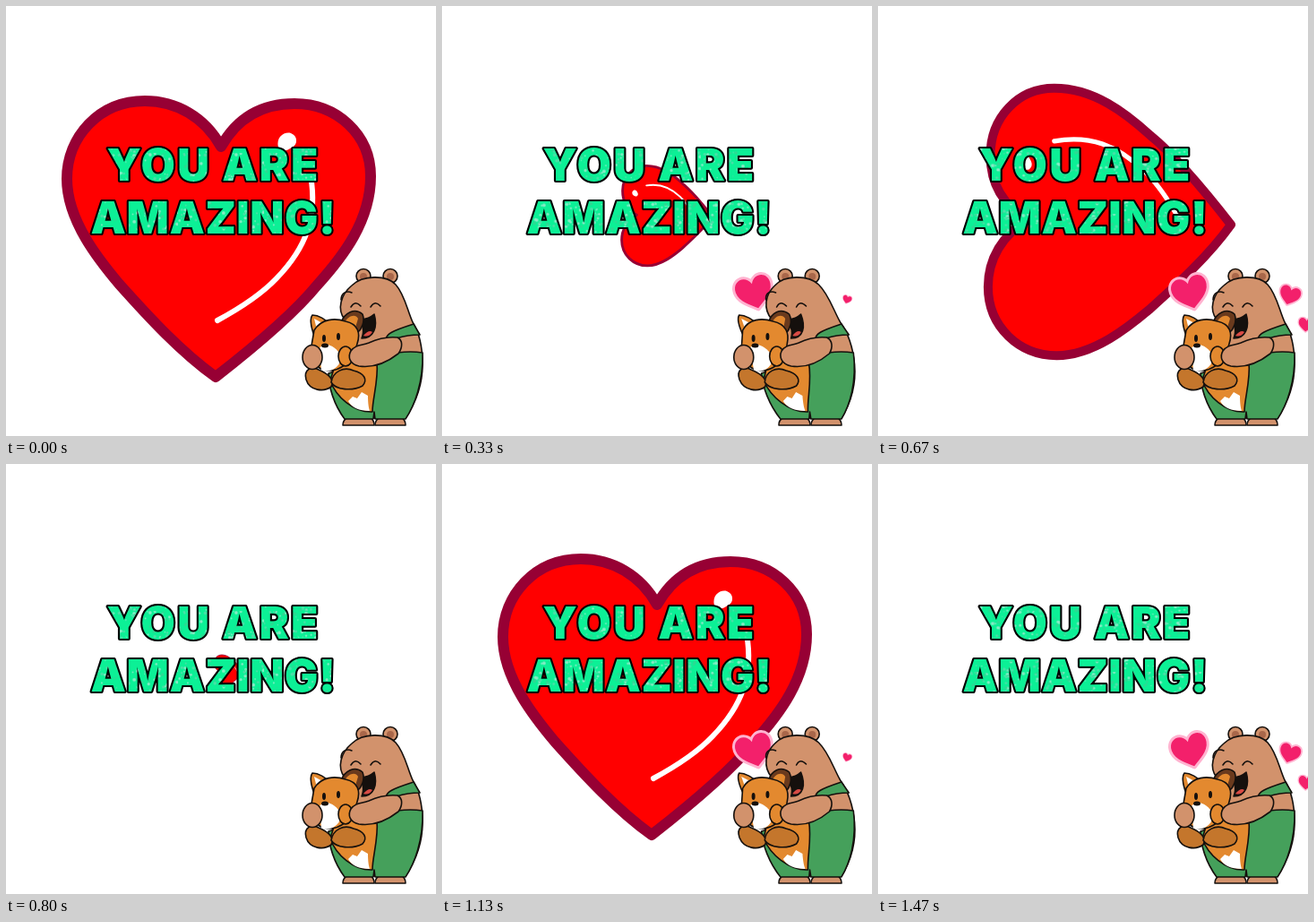
An HTML page with a canvas for the animation above (1540 ms loop, 480 by 480 pixels).

```html
<!DOCTYPE html>
<html lang="en">
<head>
<meta charset="utf-8">
<title>You are amazing</title>
<style>
html, body { margin: 0; overflow: hidden; background: #fff; }
canvas { display: block; width: 480px; height: 480px; }
</style>
</head>
<body>
<canvas id="stage" width="480" height="480"></canvas>
<script>
const ctx = document.getElementById('stage').getContext('2d');
const LOOP = 1540, STEP = 200 / 3, HUG = 12;
const TAN = '#d2926c', GREEN = '#45a05b', ORANGE = '#e3892f', RUST = '#c4762c', INK = '#15100d';

const HEART = new Path2D('M240,157C222,124 190,106 155,106C104,106 68,146 68,193C68,240 105,285 126,310C160,348 195,386 234,414C270,386 320,345 347,312C376,280 407,240 407,190C407,144 370,109 322,109C285,109 258,125 240,157Z');
const SHINE = new Path2D('M340,190C348,235 335,270 302,304C283,324 260,338 236,351');
const GLEAM = new Path2D('M304,158C301,146 311,140 318,142C326,145 326,155 319,158C314,161 309,164 304,158Z');
const LOVE = new Path2D('M0,-8C-5,-20 -21,-17 -20,-3C-19,8 -7,14 0,20C7,14 19,8 20,-3C21,-17 5,-20 0,-8Z');

const clamp = v => Math.max(0, Math.min(1, v));
const smooth = v => v * v * (3 - 2 * v);

function random(seed) {
  return () => (seed = (seed * 16807) % 2147483647) / 2147483647;
}

function makeGlitter() {
  const tile = document.createElement('canvas');
  tile.width = tile.height = 96;
  const g = tile.getContext('2d'), rnd = random(77);
  g.fillStyle = '#0cf096';
  g.fillRect(0, 0, 96, 96);
  for (let i = 0; i < 300; i++) {
    g.fillStyle = ['#2fd893', '#4be0a8', '#86ecc6'][i % 3];
    g.beginPath();
    g.arc(rnd() * 96, rnd() * 96, 0.6 + rnd() * 1.3, 0, 7);
    g.fill();
  }
  return ctx.createPattern(tile, 'repeat');
}
const glitter = makeGlitter();

function bigHeart(t) {
  // Each pulse: peak time and quarter turn
  for (const [peak, turn] of [[0, 0], [546, -1], [1100, 0]]) {
    if (Math.abs(t - peak) > 274) continue;
    const scale = 1 - smooth(clamp((Math.abs(t - peak) - 71) / 230));
    ctx.save();
    ctx.translate(240, 240);
    ctx.rotate(turn * Math.PI / 2);
    ctx.translate(10, 7);
    ctx.scale(scale, scale);
    ctx.translate(-250, -247);
    ctx.lineJoin = ctx.lineCap = 'round';
    ctx.fillStyle = '#f00';
    ctx.fill(HEART);
    ctx.lineWidth = 7 + 5 * scale;
    ctx.strokeStyle = '#970034';
    ctx.stroke(HEART);
    ctx.lineWidth = 6;
    ctx.strokeStyle = ctx.fillStyle = '#fff';
    ctx.stroke(SHINE);
    ctx.fill(GLEAM);
    ctx.restore();
    return;
  }
}

function title(frame) {
  ctx.font = '900 49.5px Inter, sans-serif';
  ctx.textAlign = 'center';
  ctx.lineJoin = 'round';
  ctx.lineWidth = 4.2;
  ctx.strokeStyle = '#000';
  const rnd = random(frame % 4 * 991 + 13);
  glitter.setTransform(new DOMMatrix().translate(rnd() * 96, rnd() * 96));
  ctx.fillStyle = glitter;
  for (const [line, y, spacing] of [['YOU ARE', 194.5, 2.2], ['AMAZING!', 253.5, 0.6]]) {
    ctx.letterSpacing = spacing + 'px';
    ctx.strokeText(line, 231.5, y);
    ctx.fillText(line, 231.5, y);
  }
}

function love(x, y, size, angle) {
  if (size <= 0) return;
  ctx.save();
  ctx.translate(x, y);
  ctx.rotate(angle);
  ctx.scale(size, size);
  ctx.lineJoin = 'round';
  ctx.lineWidth = 6;
  ctx.strokeStyle = '#ffb3d0';
  ctx.stroke(LOVE);
  ctx.fillStyle = '#f3206b';
  ctx.fill(LOVE);
  ctx.restore();
}

function smallHearts(p) {
  const left = clamp((p - 2) / 2.7);
  love(360 - 12 * left, 342 - 24 * left, left, -0.26);
  const right = clamp((p - 4) / 2.7);
  const settle = clamp((p - 7) / 3);
  love(446 + 17 * right - 3 * settle, 332 - 13 * right + 3 * settle, right * 0.66 - settle * 0.08, 0.3);
  love(478, 355, clamp((p - 8) / 2) * 0.42, 0.1);
}

function hug(p) {
  const lean = p < 8.8 ? Math.min(1, 1.2 * Math.sin(Math.PI * p / 8.8) ** 2) : 0;
  // Bends everything to the left above the feet
  const bend = (x, y) => {
    const h = Math.max(0, (467 - y) / 167);
    return [x - 16 * lean * h ** 1.4, y + 12 * lean * (1 - lean) * h];
  };
  const paint = (path, fill, line = INK, width = 1.6) => {
    if (fill) { ctx.fillStyle = fill; ctx.fill(path); }
    if (line) { ctx.strokeStyle = line; ctx.lineWidth = width; ctx.stroke(path); }
  };
  const shape = (d, ...style) => paint(new Path2D(
    d.replace(/([\d.]+),([\d.]+)/g, (_, x, y) => bend(+x, +y).join())), ...style);
  const oval = (x, y, rx, ry, ...style) => {
    const path = new Path2D();
    path.ellipse(...bend(x, y), rx, ry, 0, 0, 7);
    paint(path, ...style);
  };
  ctx.lineCap = ctx.lineJoin = 'round';

  // Bear
  for (const x of [399, 429]) {
    oval(x, 301.5, 8, 8, TAN);
    oval(x, 302, 4, 4, '#a9674a', null);
  }
  shape('M376,468C376,460 383,457 395,457C406,457 411,461 411,468Z', TAN);
  shape('M412,468C412,461 418,457 430,457C441,457 446,461 446,468Z', TAN);
  shape('M378,350C369,338 374,322 386,312C398,300 425,300 435,311C445,322 448,340 454,353C462,366 465,385 465,400C465,425 456,445 446,460L380,460C368,442 362,425 364,410Z', TAN);
  shape('M424,372C425,366 430,363 455,355L462,367Q448,367 436,371Z', GREEN);
  shape('M410,396L437,387Q452,385 465,387C466,420 456,446 446,461L412,461L411,453L410,461L378,461C366,445 360,425 360,410Z', GREEN);
  shape('M374,328C374,321 380,317 386,320', null);
  shape('M385,336Q390,328 396,335M407,336Q412,328 418,335', null);
  shape('M392,349Q403,351 411,344C415,358 411,371 397,371Q402,358 392,349Z', INK);
  shape('M399,368Q405,361 409,364Q405,370 399,368Z', '#d84b45', null);

  // Fox
  shape('M370,392C390,380 413,384 414,398C416,418 409,438 409,453C388,454 368,436 362,418Z', ORANGE);
  shape('M382,441L387,436L392,438L397,431L404,435C404,444 405,449 406,452Q388,452 382,441Z', '#fff', null);
  shape('M344,368C340,357 339,349 342,345C349,345 357,350 361,355Z', ORANGE);
  shape('M347,361L344,349L355,355Z', '#fff', null);
  shape('M374,353C378,343 389,336 398,344C401,352 397,361 392,365Z', '#6a3a1d');
  shape('M378,353C382,346 390,343 393,349L390,359Z', ORANGE, null);
  shape('M344,362C352,349 367,348 379,352C393,355 396,365 392,377C388,397 373,408 358,407C345,405 339,393 341,379Z', ORANGE);
  shape('M350,382C356,374 368,379 374,391C374,402 364,410 352,407Z', '#fff', null);
  oval(355, 371, 2, 4, INK, null);
  oval(371, 369, 2, 4, INK, null);
  oval(356, 379, 4, 2.5, INK, null);
  oval(379, 391, 8, 11, ORANGE);

  // Arms and the fox's feet
  shape('M437,370C443,373 443,381 438,388C424,399 408,404 394,402C384,400 381,392 385,385C390,378 397,379 405,376C416,371 427,369 437,370Z', TAN);
  shape('M335,417C332,406 341,401 349,406C361,411 367,418 363,425C355,431 339,430 335,417Z', RUST);
  shape('M363,420C365,408 377,402 388,407C400,410 404,417 398,424C387,430 368,429 363,420Z', RUST);
  oval(342, 392, 11, 13.5, TAN);
}

function draw(now) {
  const frame = Math.min(22, Math.floor((now % LOOP + 4) / STEP));
  ctx.fillStyle = '#fff';
  ctx.fillRect(0, 0, 480, 480);
  bigHeart(frame * STEP);
  title(frame);
  smallHearts(frame % HUG);
  hug(frame % HUG);
}

const start = performance.now();
function tick() {
  draw(performance.now() - start);
  requestAnimationFrame(tick);
}
tick();
</script>
</body>
</html>
```
